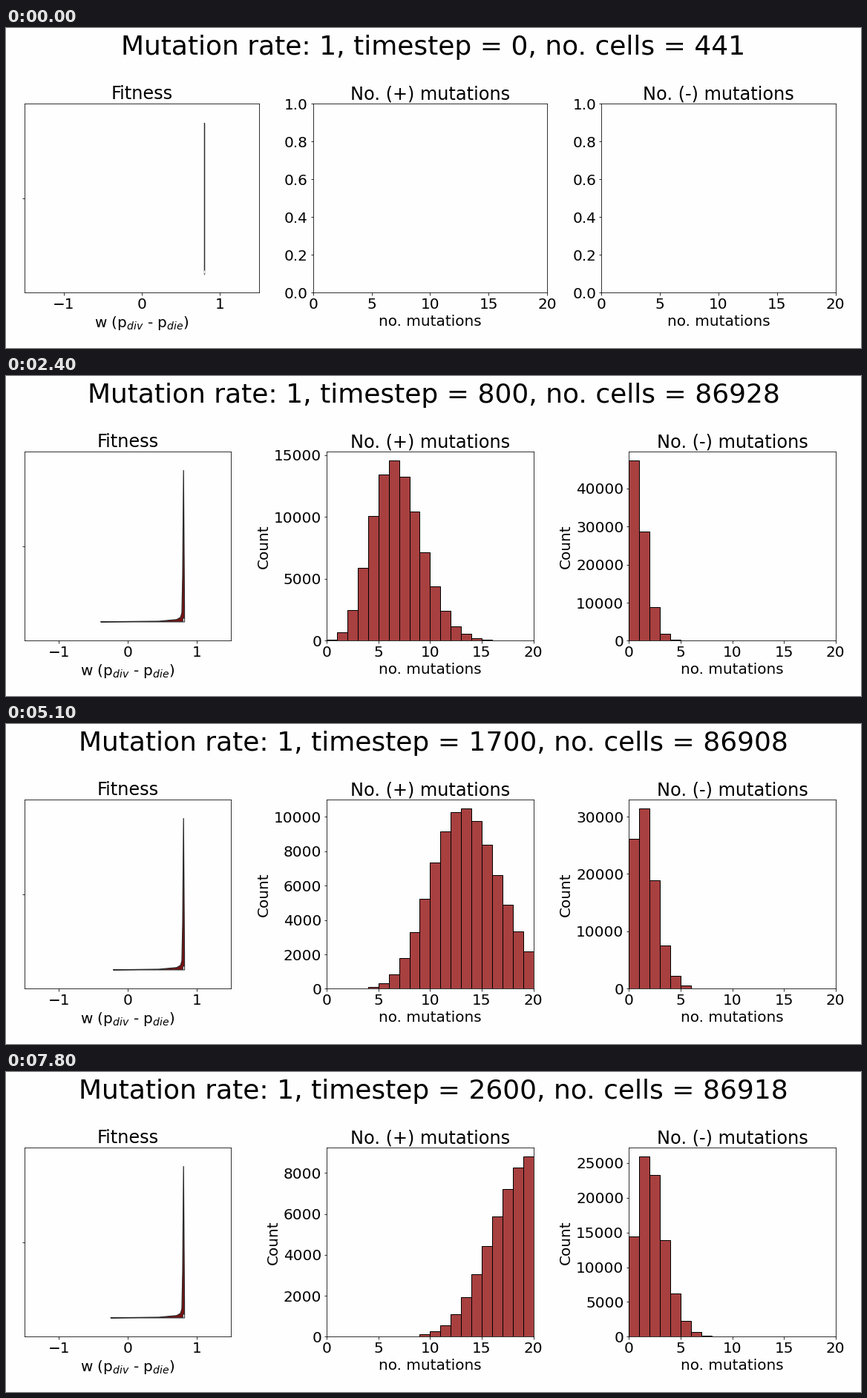
Write a matplotlib script that moves like this. It is 1152 px wide and 432 px high and loops after 8 s.

```python
import math

import matplotlib.pyplot as plt
import numpy as np
from matplotlib.animation import FuncAnimation

W, H = 1152, 432
BOTTOM, TOP = 74.6, 330
LEFT, RIGHT = 25.1, 1117.7
STEPS = 26
BINS = range(40)
INK = "#2a2a2a"
PAPER = "#fefefe"

plt.rcParams.update({"font.family": "DejaVu Sans", "font.size": 20})


def cell_count(t):
    if t == 0:
        return 441
    return round(np.interp(t, [600, 1000, 1400, 1700, 2100, 2600],
                           [86951, 86904, 86985, 86908, 87023, 86918]))


def spread(mean, sharpness):
    """Poisson law, narrowed by a power, as shares per bin."""
    logs = [k * math.log(mean) - math.lgamma(k + 1) for k in BINS]
    share = np.exp(sharpness * (np.array(logs) - max(logs)))
    return share / share.sum()


def gains(t):
    return spread(0.45 + 0.0075 * t, 1.05 + 0.000095 * t)


def losses(t):
    return spread(0.08 + 0.00066 * t, 1)


def violin_points(t):
    """Half violin: a narrow spike with a long thin tail to the left."""
    density = np.array([0, 0.1, 1, 0.3, 0.06, 0.03, 0.015, 0.004, 0])
    if t:
        tail = np.interp(t, [100, 1000, 1400, 2600], [-0.2, -0.45, -0.2, -0.25])
        x = [0.822, 0.822, 0.808, 0.795, 0.784, 0.765, 0.71, 0.45, tail]
    else:
        x = np.full(len(density), 0.8)
    return np.column_stack([x, 0.4 - 0.8 * density])


fig = plt.figure(figsize=(W / 72, H / 72), dpi=72, facecolor=PAPER)
heading = fig.suptitle("", fontsize=36)
axes = [fig.add_axes([0.1 + 0.3 * i, 0.2, 0.2, 0.6], facecolor=PAPER)
        for i in range(3)]
fit, gain, loss = axes

fit.set(title="Fitness", xlabel="w (p$_{div}$ - p$_{die}$)",
        xlim=(-1.5, 1.5), ylim=(0.5, -0.5))
fit.set_yticks([0], [""])
violin, = fit.fill(*violin_points(0).T, fc="#7a1111", ec=INK, lw=1.25,
                   joinstyle="round")
box, = fit.plot([0.8, 0.8], [0.389, 0.389], color=INK, lw=5.6,
                solid_capstyle="butt")
median, = fit.plot([0.8], [0.389], "|", color="white", ms=4.7, mew=1.25)

panels = []
for ax, sign, law in ((gain, "+", gains), (loss, "-", losses)):
    ax.set(title=f"No. ({sign}) mutations", xlabel="no. mutations")
    bars = ax.bar(np.arange(20) + 0.5, np.zeros(20), width=1,
                  fc=(139 / 255, 0, 0, 0.75), ec="black", lw=1)
    ax.set_xlim(0, 20)
    panels.append((ax, bars, law))


def place(width):
    gap = (RIGHT - LEFT - 3 * width) / 2
    for i, ax in enumerate(axes):
        x = LEFT + i * (width + gap)
        ax.set_position([x / W, BOTTOM / H, width / W, (TOP - BOTTOM) / H])


def draw(frame):
    t = min(frame // 3, STEPS) * 100
    total = cell_count(t)
    heading.set_text(f"Mutation rate: 1, timestep = {t}, no. cells = {total}")
    place(278.3 if t else 315.4)

    violin.set_xy(violin_points(t))
    box.set_xdata([0.795, 0.815] if t else [0.8, 0.8])
    median.set_xdata([0.806 if t else 0.8])

    for ax, bars, law in panels:
        counts = total * law(t) if t else np.zeros(len(BINS))
        for bar, n in zip(bars, counts):
            bar.set_height(n)
            bar.set_visible(n > 60)
        ax.set_ylim(0, 1.05 * counts.max() if t else 1)
        ax.set_ylabel("Count" if t else "")
    return []


anim = FuncAnimation(fig, draw, frames=80, interval=100, repeat=True,
                     repeat_delay=0, blit=False)
plt.show()
```
